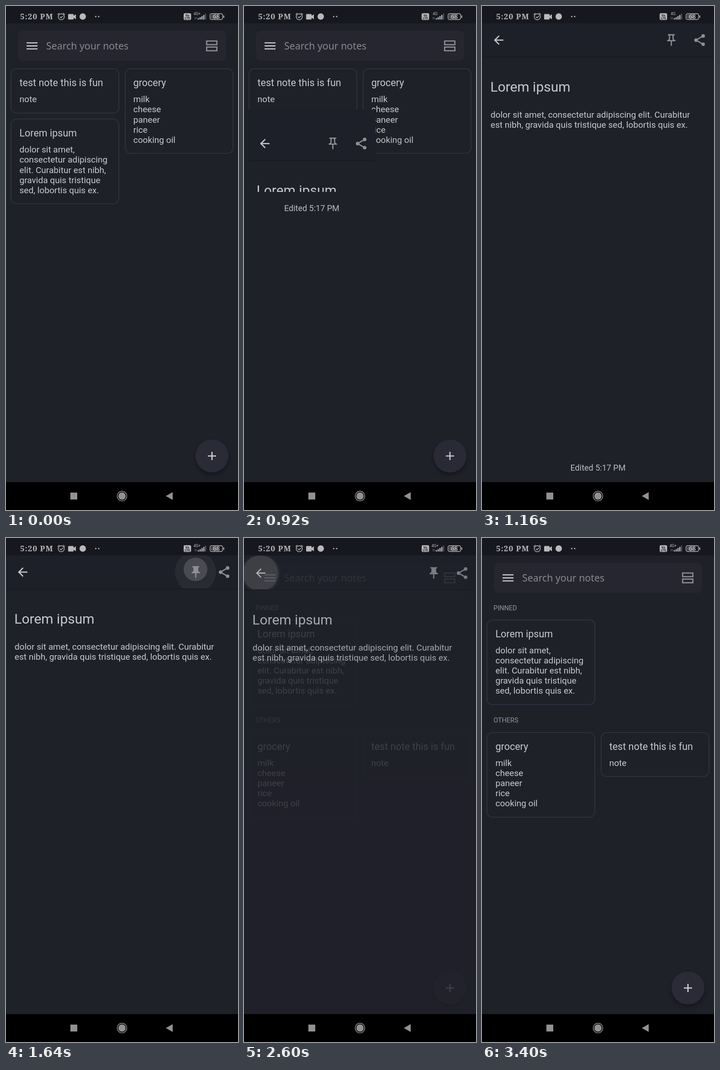
Write an HTML page that moves like this. It is 508 by 1101 pixels and loops after 3.44 s.

```html
<!DOCTYPE html>
<html lang="en">
<head>
<meta charset="utf-8">
<title>Notes</title>
<style>
html, body { margin: 0; width: 100%; height: 100%; overflow: hidden; background: #1f2129; }
#stage { position: relative; width: 508px; height: 1101px; overflow: hidden; background: #1f2129;
  color: #c8c9ce; font: 19.1px/22.1px Roboto, sans-serif; }
#stage div, #stage svg { position: absolute; box-sizing: border-box; }
.full { left: 0; top: 0; width: 508px; height: 1101px; }
.search { left: 26px; top: 53.5px; width: 456px; height: 66.5px; border-radius: 11px; background: #25262f; }
.hint { left: 88px; top: 71.7px; color: #898a90; font: 21.3px/30px "Noto Sans", "Open Sans", sans-serif; white-space: nowrap; }
.card { width: 238px; padding: 17.2px; border: 2px solid #2e2f3f; border-radius: 13px; white-space: pre; }
.card b { display: block; margin-bottom: 13px; font-weight: 400; font-size: 21.5px; line-height: 25.2px; }
.label { left: 25.3px; font-size: 14.4px; line-height: 18px; color: #97989e; }
.fab { left: 415px; top: 947px; width: 72px; height: 72px; border-radius: 50%; background: #2a2b36; box-shadow: 0 5px 9px #0005; }
#veil { left: 0; width: 508px; height: 1101px; background: #1f2129; }
#page { background: #1f2129; overflow: hidden; }
.bar { left: 0; right: 0; top: 0; height: 110px; background: #1d2028; box-shadow: 0 1px 4px #0005; }
.scroll { left: 0; right: 0; top: 110px; bottom: 66px; overflow: hidden; }
.head { left: 18.3px; top: 48.7px; font-size: 30px; line-height: 35.4px; white-space: nowrap; }
.text { left: 18.8px; right: 26px; top: 116.7px; }
#edited { left: 0; right: 0; bottom: 19px; text-align: center; font-size: 18px; color: #bcbdc2; }
.clip { left: 0; right: 0; bottom: 0; overflow: hidden; }
.dot { border-radius: 50%; background: #fff; }
.icon { width: 31px; height: 31px; top: 58.5px; fill: #8f9095; }
.status { left: 0; top: 0; width: 508px; height: 38px; background: #17181f; }
.nav { left: 0; top: 1040px; width: 508px; height: 61px; background: #000; }
</style>
</head>
<body>
<div id="stage">
  <div id="home" class="full">
    <div class="search"></div>
    <div class="hint">Search your notes</div>
    <div id="lists"></div>
    <div class="fab"></div>
    <svg class="full" viewBox="0 0 508 1101" fill="none">
      <path d="M45 80.5h24M45 87.1h24M45 93.7h24" stroke="#c6c7c9" stroke-width="2.6"/>
      <path d="M439.3 76.5h22.4v8h-22.4zM439.3 89.8h22.4v8h-22.4z" stroke="#8f9095" stroke-width="2.6"/>
      <path d="M442 983h18M451 974v18" stroke="#cfcfd3" stroke-width="2.7"/>
    </svg>
  </div>
  <div id="veil"></div>
  <div id="page">
    <div class="scroll">
      <div class="head">Lorem ipsum</div>
      <div class="text">dolor sit amet, consectetur adipiscing elit. Curabitur est nibh, gravida quis tristique sed, lobortis quis ex.</div>
    </div>
    <div id="edited">Edited 5:17 PM</div>
    <div class="bar">
      <div class="clip" style="top:38px" id="pinInk"></div>
      <div class="clip" style="top:33px" id="backInk"></div>
      <svg class="icon" viewBox="0 0 24 24" style="left:20.5px;fill:#c8c9cc"><path d="M20 11H7.83l5.59-5.59L12 4l-8 8 8 8 1.41-1.41L7.83 13H20z"/></svg>
      <svg class="icon" viewBox="0 0 24 24" style="right:77.5px" fill-rule="evenodd"><path id="pin"/></svg>
      <svg class="icon" viewBox="0 0 24 24" style="right:15.5px">
        <circle cx="18" cy="5" r="3"/><circle cx="6" cy="12" r="3"/><circle cx="18" cy="19" r="2.95"/>
        <path d="M18 5L6 12l12 7" fill="none" stroke="#8f9095" stroke-width="2"/>
      </svg>
    </div>
  </div>
  <div class="status">
    <svg width="508" height="38" fill="#b9b9bc" font-family="Noto Serif, DejaVu Serif, serif" font-weight="600">
      <text x="31" y="28.5" font-size="17" letter-spacing="1.1">5:20 PM</text>
      <g fill="none" stroke="#b9b9bc" stroke-width="1.5">
        <circle cx="121" cy="23.5" r="6.6"/>
        <path d="M113 19l4-3.5M129 19l-4-3.5M118 23.5l2.4 2.4 4-4"/>
        <rect x="446.8" y="16.8" width="27.6" height="12.8" rx="3.6"/>
      </g>
      <path d="M137.5 17.5h9q1.5 0 1.5 1.5v2.5l5-3.5v11l-5-3.5v2.5q0 1.5-1.5 1.5h-9q-1.5 0-1.5-1.5v-9q0-1.5 1.5-1.5z"/>
      <circle cx="168" cy="23" r="7"/>
      <circle cx="196.5" cy="23" r="1.6"/><circle cx="203" cy="23" r="1.6"/>
      <rect x="389" y="15.8" width="16.3" height="14.6" rx="3"/>
      <g fill="#17181f" font-family="Roboto, sans-serif" font-weight="700" font-size="7" text-anchor="middle">
        <text x="397" y="22.6">Vo</text><text x="397.2" y="29">LTE</text>
      </g>
      <text id="net" x="418.5" y="19.8" font-size="8.5" font-family="Roboto, sans-serif" font-weight="400" text-anchor="middle"></text>
      <path d="M414 24v5M417 24v5" stroke="#77787c"/>
      <path d="M421.2 29.5v-3M425.2 29.5v-5M429.2 29.5v-7.5M433.2 29.5v-10" stroke="#b9b9bc" stroke-width="2.6"/>
      <path d="M437 29.5v-13" stroke="#5b5c62" stroke-width="2.2"/>
      <rect x="449" y="19" width="15.5" height="8.4" rx="1.5" fill="#55565b"/>
      <rect x="476" y="20.5" width="1.8" height="5.4" rx=".9"/>
      <text x="460.6" y="28" font-size="13.5" text-anchor="middle">68</text>
    </svg>
  </div>
  <div class="nav">
    <svg width="508" height="61" fill="#929292">
      <path d="M141 23h15v15h-15zM350 30.5l15-8.5v17z"/>
      <circle cx="254" cy="30.5" r="8"/>
      <circle cx="254" cy="30.5" r="10.5" fill="none" stroke="#929292" stroke-width="1.5"/>
    </svg>
  </div>
</div>
<script>
const $ = id => document.getElementById(id);
const LOOP = 3440, OPEN = 871, TAP = 1630, BACK = 2566, SPAN = 300;
const W = 508, BOTTOM = 1040, RISE = 275;

const notes = {
  fun: ['test note this is fun', 'note'],
  shop: ['grocery', 'milk\ncheese\npaneer\nrice\ncooking oil'],
  lorem: ['Lorem ipsum', 'dolor sit amet,\nconsectetur adipiscing\nelit. Curabitur est nibh,\ngravida quis tristique\nsed, lobortis quis ex.']
};
const LEFT = 10.3, RIGHT = 259.5;
const card = (key, x, y) =>
  `<div class="card ${key}" style="left:${x}px;top:${y}px"><b>${notes[key][0]}</b>${notes[key][1]}</div>`;
const label = (text, y) => `<div class="label" style="top:${y}px">${text}</div>`;

$('lists').innerHTML =
  `<div id="plain">${card('fun', LEFT, 136)}${card('shop', RIGHT, 136)}${card('lorem', LEFT, 246)}</div>` +
  `<div id="pinned">${label('PINNED', 144.8)}${card('lorem', LEFT, 177.6)}${label('OTHERS', 390.2)}` +
  `${card('shop', LEFT, 423.5)}${card('fun', RIGHT, 423.5)}</div>`;
const opened = document.querySelector('#plain .lorem');

const PIN = 'V4h1c.55 0 1-.45 1-1s-.45-1-1-1H7c-.55 0-1 .45-1 1s.45 1 1 1h1v5c0 1.66-1.34 3-3 3v2h5.97v7l1 1 1-1v-7H19v-2c-1.66 0-3-1.34-3-3z';
const PIN_FULL = 'M16 9' + PIN;
const PIN_LINE = PIN_FULL + 'M14 4v5c0 1.12.37 2.16 1 3H9c.65-.86 1-1.9 1-3V4z';

const clamp = v => Math.min(1, Math.max(0, v));

function bezier(x1, y1, x2, y2) {
  const at = (a, b, s) => 3 * a * s * (1 - s) ** 2 + 3 * b * s * s * (1 - s) + s ** 3;
  return x => {
    if (x <= 0 || x >= 1) return clamp(x);
    let lo = 0, hi = 1;
    for (let i = 0; i < 24; i++) {
      const mid = (lo + hi) / 2;
      if (at(x1, x2, mid) < x) lo = mid; else hi = mid;
    }
    return at(y1, y2, lo);
  };
}
const glide = bezier(.4, 0, .2, 1);
const easeIn = bezier(.42, 0, 1, 1);

// Point on a circular arc that arrives vertically at b.
function arc(a, b, p) {
  const dx = b[0] - a[0], dy = b[1] - a[1], d = Math.hypot(dx, dy);
  const r = d * d / Math.abs(dx) / 2;
  const angle = 2 * Math.asin(d / (2 * r)) * (1 - p);
  return [b[0] - Math.sign(dx) * r * (1 - Math.cos(angle)), b[1] - Math.sign(dy) * r * Math.sin(angle)];
}

function ripple(box, x, y, touchY, down, up, R) {
  const dots = [0, 1].map(() => {
    const el = document.createElement('div');
    el.className = 'dot';
    box.append(el);
    return el;
  });
  const put = (el, cx, cy, r, alpha) => {
    el.style.cssText = `left:${cx - r}px;top:${cy - r}px;width:${2 * r}px;height:${2 * r}px;opacity:${alpha}`;
  };
  return t => {
    const out = 1 - clamp((t - up) / 200), on = clamp((t - down) / 80);
    const r = Math.min(R, .13 * Math.max(0, Math.min(t, up) - down) + .8 * Math.max(0, t - up));
    box.style.display = t > down && out > 0 ? '' : 'none';
    put(dots[0], x, y, R, .05 * on * out);
    put(dots[1], x, y + touchY * (1 - r / R), r, .16 * on * out);
  };
}
const inks = [
  ripple($('pinInk'), 415, 36, -13, 1500, TAP, 45),
  ripple($('backInk'), 36, 42, 0, 2480, BACK, 43)
];

function show(el, on) { el.style.display = on ? '' : 'none'; }

function render(t) {
  const enter = clamp((t - OPEN) / SPAN), leave = 1 - clamp((t - BACK) / SPAN);
  const p = glide(enter);
  const [l, top] = arc([11, 247], [0, 0], p);
  const [r, bottom] = arc([247, 431], [W, BOTTOM], p);
  const fall = RISE * (1 - glide(leave));
  const page = $('page').style;

  show($('page'), enter > 0 && leave > 0);
  page.left = l + 'px';
  page.top = top + 'px';
  page.width = r - l + 'px';
  page.height = bottom - top + 'px';
  page.transform = `translateY(${fall}px)`;
  page.opacity = easeIn(leave);

  show($('veil'), enter > 0 && enter < 1);
  $('veil').style.top = RISE * (1 - p) + 'px';
  $('veil').style.opacity = easeIn(enter);

  show($('home'), enter < 1 || t >= BACK);
  show($('plain'), t < TAP);
  show($('pinned'), t >= TAP);
  show(opened, enter === 0);
  show($('edited'), t < TAP);
  $('pin').setAttribute('d', t < TAP ? PIN_LINE : PIN_FULL);
  $('net').textContent = t >= 840 && t < 1360 ? '4G' : '4G+';
  inks.forEach(ink => ink(t));
}

function tick() {
  render(performance.now() % LOOP);
  requestAnimationFrame(tick);
}
tick();
</script>
</body>
</html>
```
